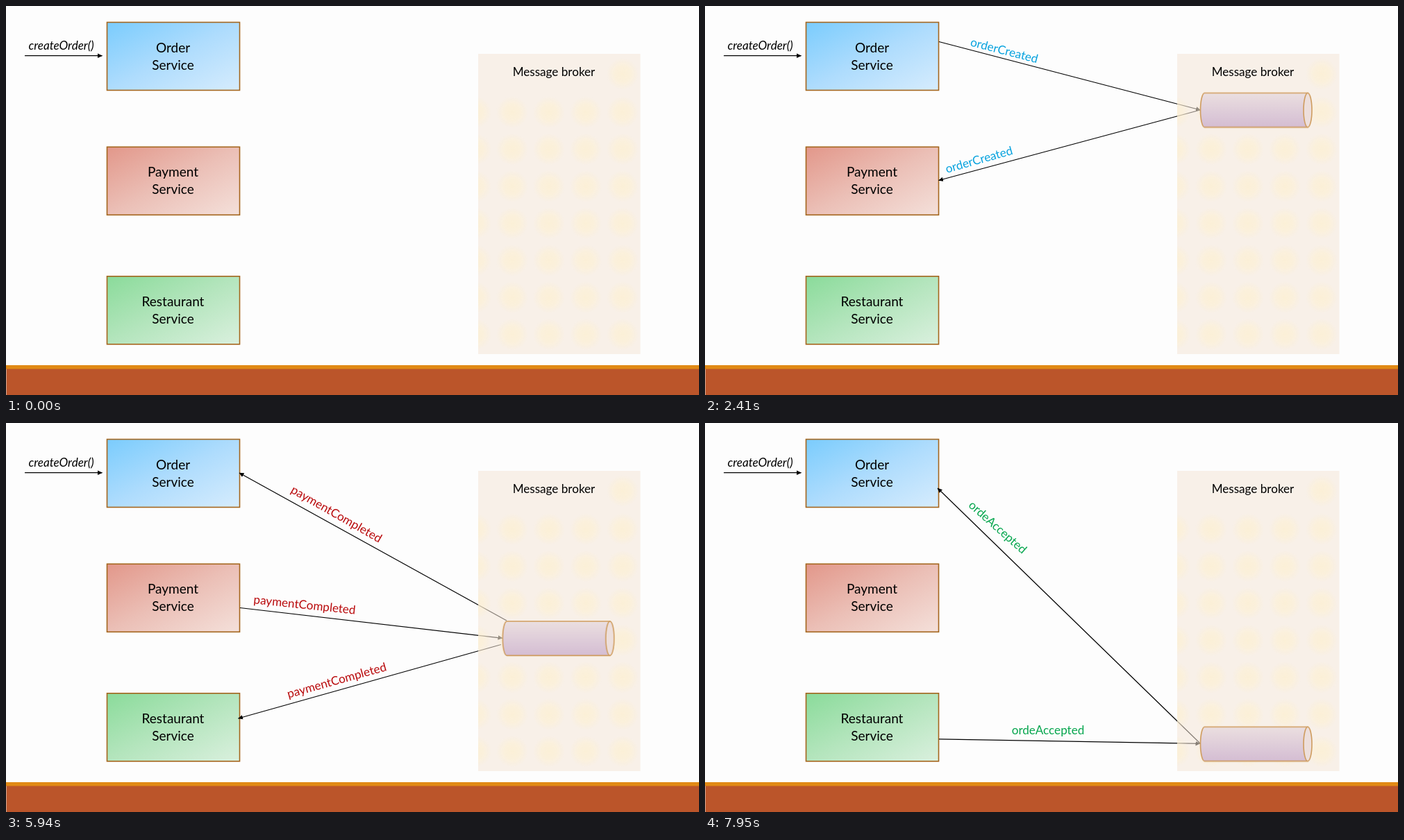
Recreate the animation shown at these times as an HTML page. Size 998 by 561 pixels, loop 8 s.

```html
<!DOCTYPE html>
<html lang="en">
<head>
<meta charset="utf-8">
<title>Order saga</title>
<style>
  html, body { margin: 0; width: 100%; height: 100%; overflow: hidden; background: #fdfdfd; }
  svg { display: block; width: 100vw; height: 100vh; }
  text { font: 17.1px Lato, "Open Sans", sans-serif; text-anchor: middle; }
  .service rect { width: 191px; height: 98px; stroke: #a4651c; stroke-width: 1.6; }
  .service text { font-size: 19px; }
  .arrow { stroke: #000; stroke-width: 1.2; marker-end: url(#head); }
  .created { fill: #06a2de; }
  .completed { fill: #b90a0c; }
  .accepted { fill: #06a64e; }

  /* Each stage of the saga replaces the previous one with a hard cut. */
  .stage { opacity: 0; animation: 8s step-end infinite; }
  .order { animation-name: order; }
  .payment { animation-name: payment; }
  .restaurant { animation-name: restaurant; }
  @keyframes order { 0% { opacity: 0 } 30.125% { opacity: 1 } 60.25%, 100% { opacity: 0 } }
  @keyframes payment { 0% { opacity: 0 } 60.25% { opacity: 1 } 90.375%, 100% { opacity: 0 } }
  @keyframes restaurant { 0% { opacity: 0 } 90.375%, 100% { opacity: 1 } }
</style>
</head>
<body>
<svg viewBox="0 0 998 561" preserveAspectRatio="none">
  <defs>
    <linearGradient id="blue" x2="1" y2="1">
      <stop stop-color="#7accfd"/><stop offset=".5" stop-color="#aedcfd"/><stop offset="1" stop-color="#d6ecfd"/>
    </linearGradient>
    <linearGradient id="red" x2="1" y2="1">
      <stop stop-color="#e2978a"/><stop offset=".5" stop-color="#ebbfb6"/><stop offset="1" stop-color="#f4e0da"/>
    </linearGradient>
    <linearGradient id="green" x2="1" y2="1">
      <stop stop-color="#8adb9a"/><stop offset=".5" stop-color="#b4e5bd"/><stop offset="1" stop-color="#daf0de"/>
    </linearGradient>
    <linearGradient id="pipe" x2="0" y2="1">
      <stop stop-color="#ebdfe0"/><stop offset="1" stop-color="#d4bdd3"/>
    </linearGradient>
    <radialGradient id="glow">
      <stop stop-color="#fdefcb"/><stop offset=".5" stop-color="#fdefcb" stop-opacity=".75"/>
      <stop offset="1" stop-color="#fdefcb" stop-opacity="0"/>
    </radialGradient>
    <pattern id="spots" x="702.5" y="126.5" width="53" height="53.4" patternUnits="userSpaceOnUse">
      <circle cx="26.5" cy="26.7" r="23" fill="url(#glow)"/>
    </pattern>
    <marker id="head" markerUnits="userSpaceOnUse" markerWidth="7" markerHeight="7" refX="6.5" refY="3.5" orient="auto">
      <path d="M0 .3 7 3.5 0 6.7z"/>
    </marker>
    <g id="queue" stroke="#cf9c5e" stroke-width="1.6">
      <path d="M155 0H6.5A6 24.7 0 0 0 6.5 49.4H155z" fill="url(#pipe)"/>
      <ellipse cx="155" cy="24.7" rx="6" ry="24.7" fill="#eddfdc"/>
    </g>
  </defs>

  <rect width="998" height="561" fill="#fdfdfd"/>
  <rect y="518" width="998" height="6" fill="#e18a15"/>
  <rect y="523.5" width="998" height="38" fill="#bb552a"/>
  <rect y="523.5" width="1" height="38" fill="#d3a592"/>

  <text x="79.5" y="63" font-style="italic" style="font-style:italic">createOrder()</text>
  <path class="arrow" d="M27 71.7H138.5"/>

  <g class="service">
    <rect x="145.5" y="23.5" fill="url(#blue)"/>
    <text x="240.5" y="66.5">Order</text><text x="240.5" y="91.5">Service</text>
    <rect x="145.5" y="203.3" fill="url(#red)"/>
    <text x="240.5" y="246.3">Payment</text><text x="240.5" y="271.3">Service</text>
    <rect x="145.5" y="389.8" fill="url(#green)"/>
    <text x="240.5" y="432.8">Restaurant</text><text x="240.5" y="457.8">Service</text>
  </g>

  <g class="stage order">
    <path class="arrow" d="M337 51.5 713.5 150"/>
    <path class="arrow" d="M713 150 336.5 251.5"/>
    <g class="created">
      <text transform="translate(431 64) rotate(14.5)" y="6">orderCreated</text>
      <text transform="translate(394.5 221.5) rotate(-16)" y="6">orderCreated</text>
    </g>
  </g>

  <g class="stage payment">
    <path class="arrow" d="M721 285 336 72"/>
    <path class="arrow" d="M337 266.5 715 310.3"/>
    <path class="arrow" d="M713 319.5 334.5 426"/>
    <g class="completed">
      <text transform="translate(475.5 132) rotate(29.7)" y="5">paymentCompleted</text>
      <text transform="translate(430 263) rotate(6)" y="5">paymentCompleted</text>
      <text transform="translate(476.5 372) rotate(-15.7)" y="5">paymentCompleted</text>
    </g>
  </g>

  <g class="stage restaurant">
    <path class="arrow" d="M337 455.8 713 462.3"/>
    <path class="arrow" d="M713 462 335 94"/>
    <g class="accepted">
      <text x="494" y="449">ordeAccepted</text>
      <text transform="translate(421 151) rotate(41.5)" y="5">ordeAccepted</text>
    </g>
  </g>

  <!-- The translucent broker panel dims the arrows that run beneath it. -->
  <g>
    <rect x="680" y="69" width="233.5" height="433" fill="#f4e5d7" opacity=".55"/>
    <rect x="680" y="126.5" width="233.5" height="375.5" fill="url(#spots)" opacity=".6"/>
    <circle cx="888" cy="98" r="23" fill="url(#glow)" opacity=".6"/>
    <text x="789" y="101.3">Message broker</text>
  </g>

  <use class="stage order" href="#queue" x="713" y="125.5"/>
  <use class="stage payment" href="#queue" x="714.7" y="286"/>
  <use class="stage restaurant" href="#queue" x="713" y="438.3"/>
</svg>
</body>
</html>
```
